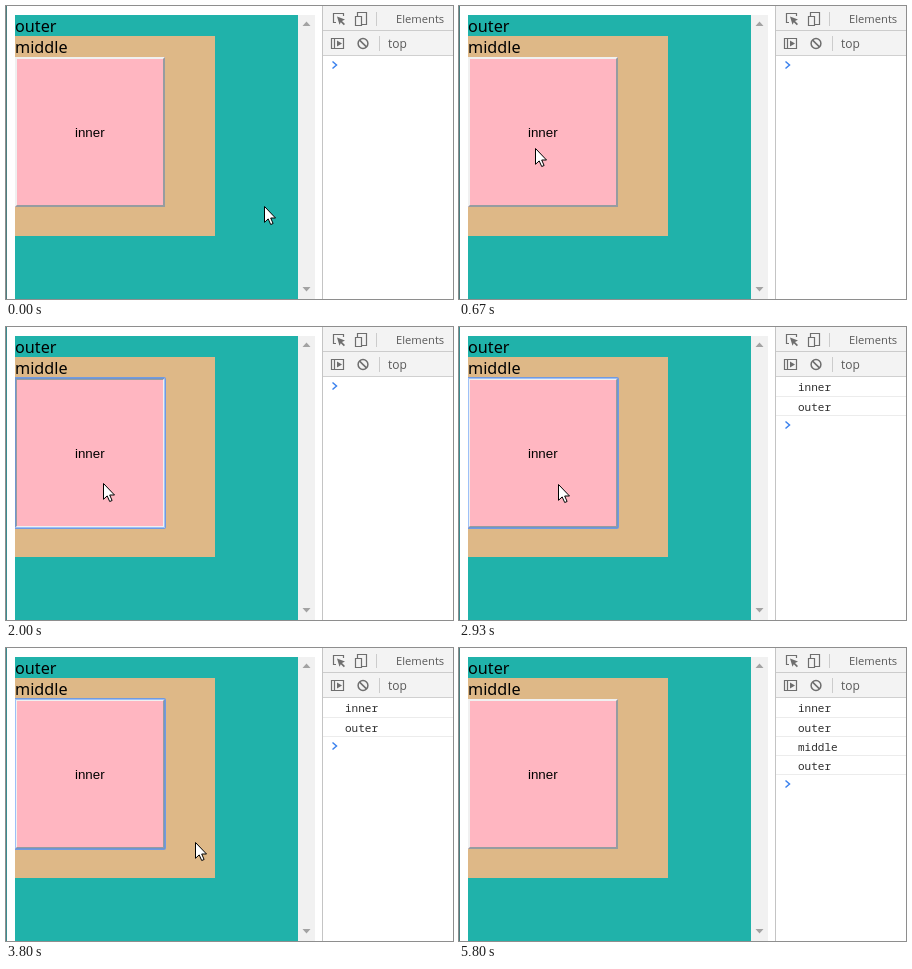
Recreate the animation shown at these times as an HTML page. Size 447x293 px, loop 5.99 s.

```html
<!DOCTYPE html>
<html lang="en">
<head>
<meta charset="utf-8">
<title>Event bubbling</title>
<style>
  html, body { margin: 0; width: 100%; height: 100%; overflow: hidden; background: #fff; }
  svg { display: block; }
  rect { shape-rendering: crispEdges; }
  .page { font: 16.2px "Noto Sans", "Open Sans", sans-serif; }
  .button { font: 13.33px "Liberation Sans", Arial, sans-serif; }
  .tools { font: 12px "Open Sans", "Noto Sans", sans-serif; fill: #5a5a5a; }
  .log { font: 11px "Noto Sans Mono", "DejaVu Sans Mono", monospace; fill: #303030; }
  .icon { fill: none; stroke: #6e6e6e; stroke-width: 1.2; }
  .solid { fill: #6e6e6e; stroke: none; }
</style>
</head>
<body>
<svg width="447" height="293" viewBox="0 0 447 293">
  <rect id="edge" width="1" height="293"/>

  <!-- page -->
  <rect x="9" y="9" width="283" height="284" fill="#20b2aa"/>
  <rect x="9" y="30" width="200" height="200" fill="#deb887"/>
  <rect x="9" y="51" width="150" height="150" fill="#ffb6c1"/>
  <path id="topLeft" d="M9 51H159L157 53H11V199L9 201Z"/>
  <path id="bottomRight" d="M159 201H9L11 199H157V53L159 51Z"/>
  <g id="ring" fill="none" stroke="#4d90fe">
    <path d="M9 50.5H158.500Q159.500 50.500 159.500 51.500V200.500Q159.500 201.500 158.500 201.500H9" stroke-opacity=".75"/>
    <path d="M9.500 51.500H158.500V200.500H9.500Z" stroke-opacity=".5"/>
  </g>
  <text class="page" x="9" y="26">outer</text>
  <text class="page" x="9" y="47">middle</text>
  <text class="button" x="69" y="131">inner</text>

  <!-- scrollbar -->
  <rect x="292" y="9" width="17" height="284" fill="#f1f1f1"/>
  <path d="M296.500 20L300.500 15.500 304.500 20ZM296.500 281L300.500 285.500 304.500 281Z" fill="#a3a3a3"/>

  <!-- developer tools -->
  <rect x="316" width="131" height="50" fill="#f3f3f3"/>
  <rect x="316" y="24" width="131" height="1" fill="#ccc"/>
  <rect x="316" y="49" width="131" height="1" fill="#d0d0d0"/>
  <rect x="316" width="1" height="293" fill="#c4c4c4"/>
  <rect x="370" y="6" width="1" height="14" fill="#ccc"/>
  <rect x="373" y="30" width="1" height="15" fill="#ccc"/>
  <g class="icon">
    <path d="M330 16.500H327.500V7.500H337.500V10"/>
    <path class="solid" d="M331 10.500L339 13.500 336 15 339 18 337.800 19.200 334.800 16.200 333.500 18.800Z"/>
    <path d="M351.500 10V6.500H360.500V18.500H356M349.500 10.500H355.500V19.500H349.500Z"/>
    <path d="M325.500 32.500H337.500V42.500H325.500ZM328.500 32.500V42.500"/>
    <path class="solid" d="M331 34.500L336 37.500 331 40.500Z"/>
    <circle cx="357" cy="37.500" r="4.900" stroke-width="1.500"/>
    <path d="M353.600 34.100L360.400 40.900" stroke-width="1.500"/>
  </g>
  <text class="tools" x="390" y="17" style="font-size:11.2px">Elements</text>
  <text class="tools" x="382" y="42">top</text>
  <g id="logs"></g>
  <path id="prompt" d="M326.500 55.500L330.500 59 326.500 62.500" fill="none" stroke="#3c82ee" stroke-width="1.500"/>

  <path id="cursor" d="M.5 .5V16.300L4.200 12.900 6.700 18.500 9.100 17.500 6.700 12H11.500Z" fill="#fff" stroke="#000"/>
</svg>
<script>
const LOOP = 5990, STEP = 1000 / 15;
const $ = id => document.getElementById(id);

// [step, x, y]: resting points of the pointer
const path = [
  [0, 258, 200], [1, 238, 184], [3, 238, 184], [10, 76, 142],
  [16, 76, 142], [20, 97, 156], [43, 97, 156], [52, 146, 180],
  [57, 189, 194], [74, 189, 194], [75, 188, 195], [78, 109, 280]
];

const rows = ["inner", "outer", "middle", "outer"].map((word, i) => {
  const y = 69 + i * 19;
  $("logs").insertAdjacentHTML("beforeend",
    `<g><text class="log" x="339" y="${y - 5 + (i > 0)}">${word}</text>
     <rect x="317" y="${y}" width="130" height="1" fill="#ececec"/></g>`);
  return $("logs").lastChild;
});

const show = (el, on) => el.setAttribute("visibility", on ? "visible" : "hidden");

function pointer(step) {
  const i = path.findIndex(p => p[0] >= step);
  if (i < 1) return path[0].slice(1);
  const [s0, x0, y0] = path[i - 1], [s1, x1, y1] = path[i];
  const u = (step - s0) / (s1 - s0), e = u * u * (3 - 2 * u);
  return [Math.round(x0 + (x1 - x0) * e), Math.round(y0 + (y1 - y0) * e)];
}

function draw(time) {
  const step = Math.floor((time % LOOP + 4) / STEP);
  const pressed = step >= 30 && step < 32;
  const count = step < 32 ? 0 : step < 68 ? 2 : 4;

  $("topLeft").setAttribute("fill", pressed ? "#969ca0" : "#f0f0f0");
  $("bottomRight").setAttribute("fill", pressed ? "#f0f0f0" : "#969ca0");
  show($("ring"), step >= 30 && step < 66);
  $("edge").setAttribute("fill", step >= 30 && step < 87 ? "#3c8c90" : "#4d7f80");

  rows.forEach((row, i) => show(row, i < count));
  $("prompt").setAttribute("transform", `translate(0 ${Math.round(count * 19.3)})`);

  show($("cursor"), step < 79);
  if (step < 79) $("cursor").setAttribute("transform", `translate(${pointer(step)})`);
}

const start = performance.now();
function tick() {
  draw(performance.now() - start);
  requestAnimationFrame(tick);
}
tick();
</script>
</body>
</html>
```
